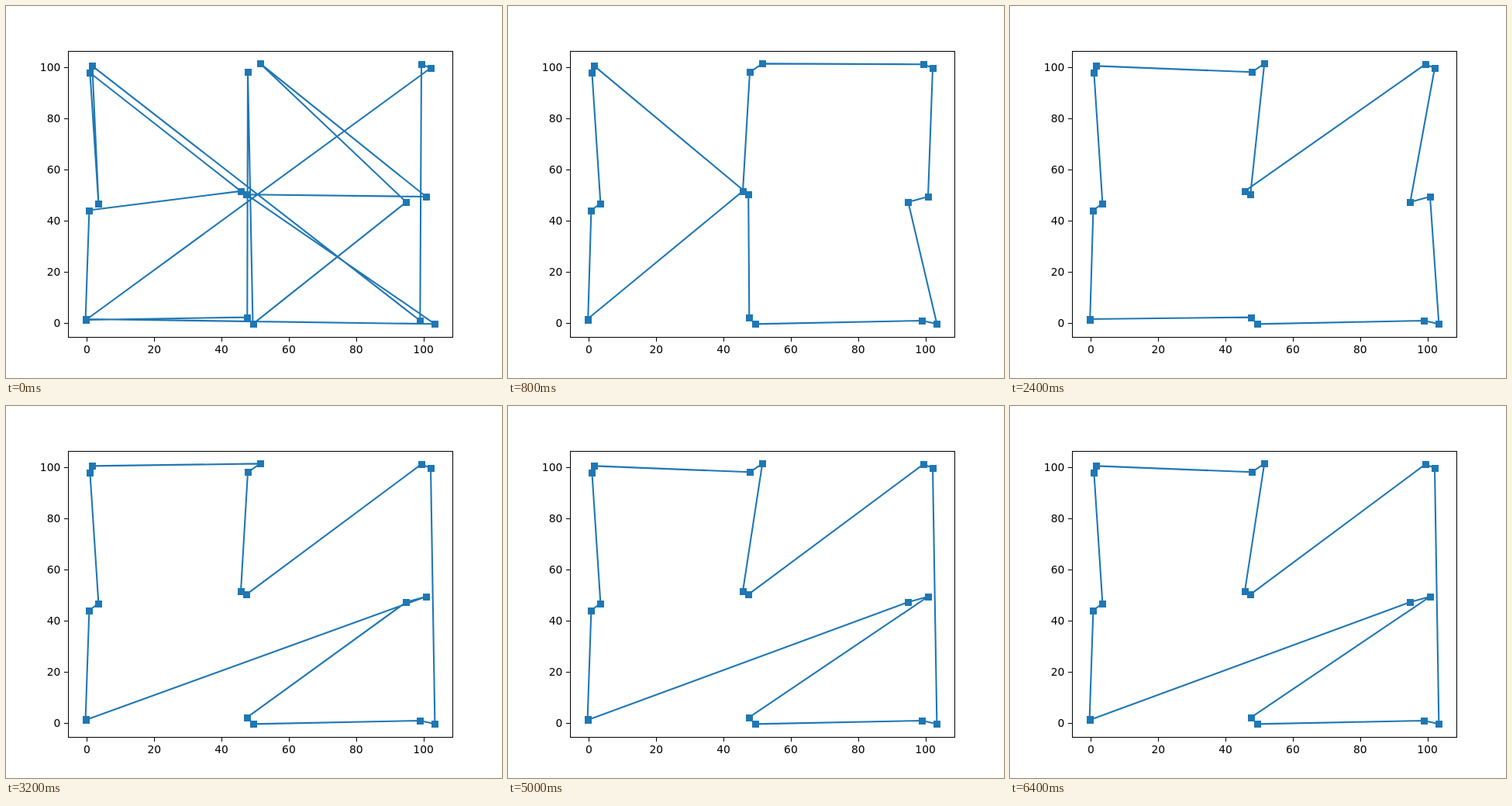
An HTML page that plays this animation: 640x480 px, repeating every 8 s.

```html
<!DOCTYPE html>
<html lang="en">
<head>
<meta charset="utf-8">
<title>Route search</title>
<style>
  html, body { margin: 0; width: 100%; height: 100%; overflow: hidden; background: #fff; }
  svg { display: block; }
  text { font: 13.89px "DejaVu Sans", sans-serif; }
  #axes { fill: none; stroke: #000; stroke-width: 1.1; shape-rendering: crispEdges; }
  #tour { fill: none; stroke: #1f77b4; stroke-width: 2.083; stroke-linejoin: round; }
  #cities { fill: #1f77b4; }
</style>
</head>
<body>
<svg width="640" height="480" viewBox="0 0 640 480">
  <polygon id="tour"/>
  <g id="cities"></g>
  <g id="axes"><rect x="80.5" y="58.5" width="496" height="369"/></g>
  <g id="labels"></g>
</svg>
<script>
const LOOP = 8000;

const cities = {
  A: [111.3, 77.4], B: [108.4, 86.2], C: [119.4, 254.9], D: [107.4, 263.5],
  E: [102.6, 404], e: [103.2, 405], F: [303, 238.9], G: [310.2, 243.2],
  H: [312, 85.3], I: [328.2, 74.4], J: [536, 75.2], K: [548, 80],
  L: [542, 246], M: [516.4, 253], N: [534.3, 406], O: [553.4, 410.3],
  P: [318.5, 410.4], Q: [311.3, 401.6]
};

// Closed tours that recur during the search.
const comb = "ABCDEeFGQPNOMLKJIH";
const zigzag = "ABCDEeMLQPNOKJGFIH";
const zigzagTop = "ABCDEeMLQPNOKJGFHI";

// [start in ms, visiting order]
const steps = [
  [0, "OEDFBCANJKeQHPMILG"],
  [200, "ACBDEeGHIJKLMONPQF"],
  [400, "ABCDEeFHIJKLMONPQG"],
  [600, "ABCDeEFHIJKMLONPQG"],
  [800, "ABCDeEFHIJKLMONPQG"],
  [1000, "ABCDEeHFGQPNOMLKJI"],
  [1200, comb],
  [1800, "ABCDeEFGQPNOMLKJIH"],
  [2200, comb],
  [2400, "ABCDeEQPNOLMKJFGIH"],
  [2600, zigzag],
  [3000, zigzagTop],
  [3200, "ABCDEeLMQPNOKJGFHI"],
  [3400, zigzag],
  [3600, zigzagTop],
  [4200, zigzag],
  [4600, zigzagTop],
  [5000, zigzag],
  [6000, "ABCDEeLMQPNOKJGFIH"],
  [6200, "ABCDeEMLQPNOKJGFIH"],
  [6400, zigzag]
];

const byId = id => document.getElementById(id);

function add(parent, tag, attrs, text = "") {
  const node = document.createElementNS("http://www.w3.org/2000/svg", tag);
  for (const key in attrs) node.setAttribute(key, attrs[key]);
  node.textContent = text;
  byId(parent).append(node);
}

for (const [x, y] of Object.values(cities)) {
  add("cities", "rect", { x: Math.round(x) - 4, y: Math.round(y) - 4, width: 9, height: 9 });
}

for (let v = 0; v <= 100; v += 20) {
  const x = 104.4 + 4.342 * v, y = 409 - 3.3 * v;
  add("axes", "path", { d: `M${Math.round(x) + 0.5} 428v5M80 ${Math.round(y) + 0.5}h-5` });
  add("labels", "text", { x, y: 448, "text-anchor": "middle" }, v);
  add("labels", "text", { x: 70.3, y: y + 5, "text-anchor": "end" }, v);
}

let shown;
function draw() {
  const t = performance.now() % LOOP;
  const order = steps.findLast(([start]) => start <= t)[1];
  if (order !== shown) {
    byId("tour").setAttribute("points", [...order].map(c => cities[c]).join(" "));
    shown = order;
  }
  requestAnimationFrame(draw);
}
draw();
</script>
</body>
</html>
```
